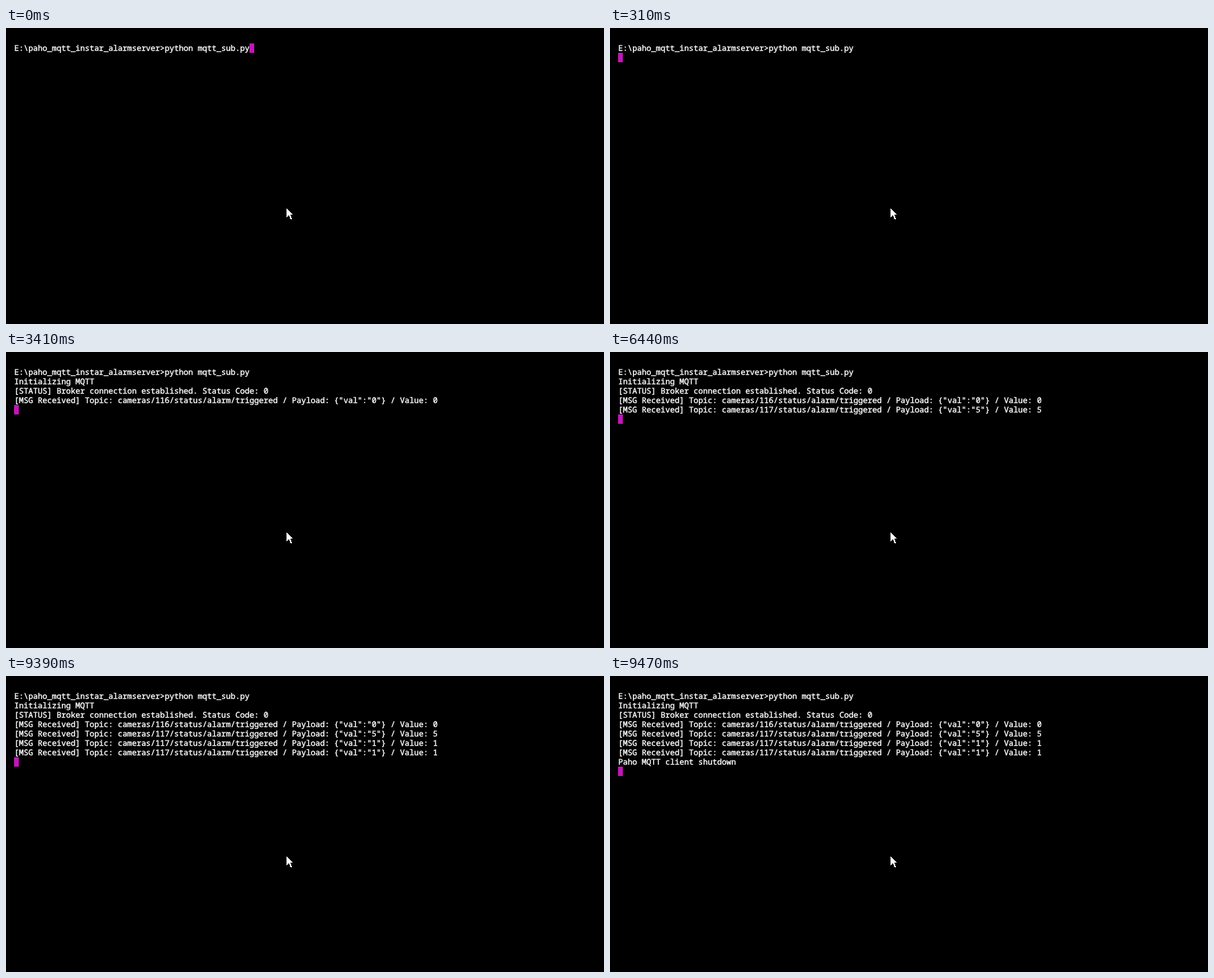
Animation of 889x441 px, one loop 10000 ms. Source, as an HTML page:

```html
<!DOCTYPE html>
<html lang="en">
<head>
<meta charset="utf-8">
<title>MQTT subscriber</title>
<style>
  html, body { margin: 0; height: 100%; overflow: hidden; background: #000; }
  svg { display: block; }
  text {
    font: 500 11.667px "Noto Sans Mono", "DejaVu Sans Mono", monospace;
    font-variant-ligatures: none;
    text-rendering: geometricPrecision;
    fill: #fff;
    stroke: #fff;
    stroke-width: .4px;
  }
</style>
</head>
<body>
<svg width="889" height="441" viewBox="0 0 889 441">
  <g id="screen"></g>
  <rect id="cursor" width="7" height="14" fill="#c315b9"/>
  <path d="M417 268.4L426.6 278H422.5L425.5 285H423L420.5 279L417 282.5Z" fill="#fff" shape-rendering="crispEdges"/>
</svg>
<script>
const LOOP = 10000, LEFT = 12, TOP = 23, CHAR = 7, ROW = 14, BASELINE = 11;
const screen = document.getElementById('screen');
const cursor = document.getElementById('cursor');
const message = (camera, value) =>
  `[MSG Received] Topic: cameras/${camera}/status/alarm/triggered / Payload: {"val":"${value}"} / Value: ${value}`;

// Each line with the time at which it is printed
const lines = [
  [0, 'E:\\paho_mqtt_instar_alarmserver>python mqtt_sub.py'],
  [1390, 'Initializing MQTT'],
  [1390, '[STATUS] Broker connection established. Status Code: 0'],
  [3410, message(116, 0)],
  [6440, message(117, 5)],
  [7450, message(117, 1)],
  [9390, message(117, 1)],
  [9470, 'Paho MQTT client shutdown']
].map(([time, content], row) => {
  const node = document.createElementNS('http://www.w3.org/2000/svg', 'text');
  node.textContent = content;
  node.setAttribute('x', LEFT + .3);
  node.setAttribute('y', TOP + row * ROW + BASELINE);
  screen.append(node);
  return { time, node };
});

function draw() {
  const t = performance.now() % LOOP;
  let row = 0;
  for (const { time, node } of lines) {
    const printed = t >= time;
    node.style.display = printed ? '' : 'none';
    row += printed;
  }
  // The cursor waits after the command until Enter is pressed
  const typing = t < 310;
  cursor.setAttribute('x', LEFT + (typing ? lines[0].node.textContent.length * CHAR : 0));
  cursor.setAttribute('y', TOP + (typing ? 0 : row) * ROW);
  requestAnimationFrame(draw);
}
draw();
</script>
</body>
</html>
```
